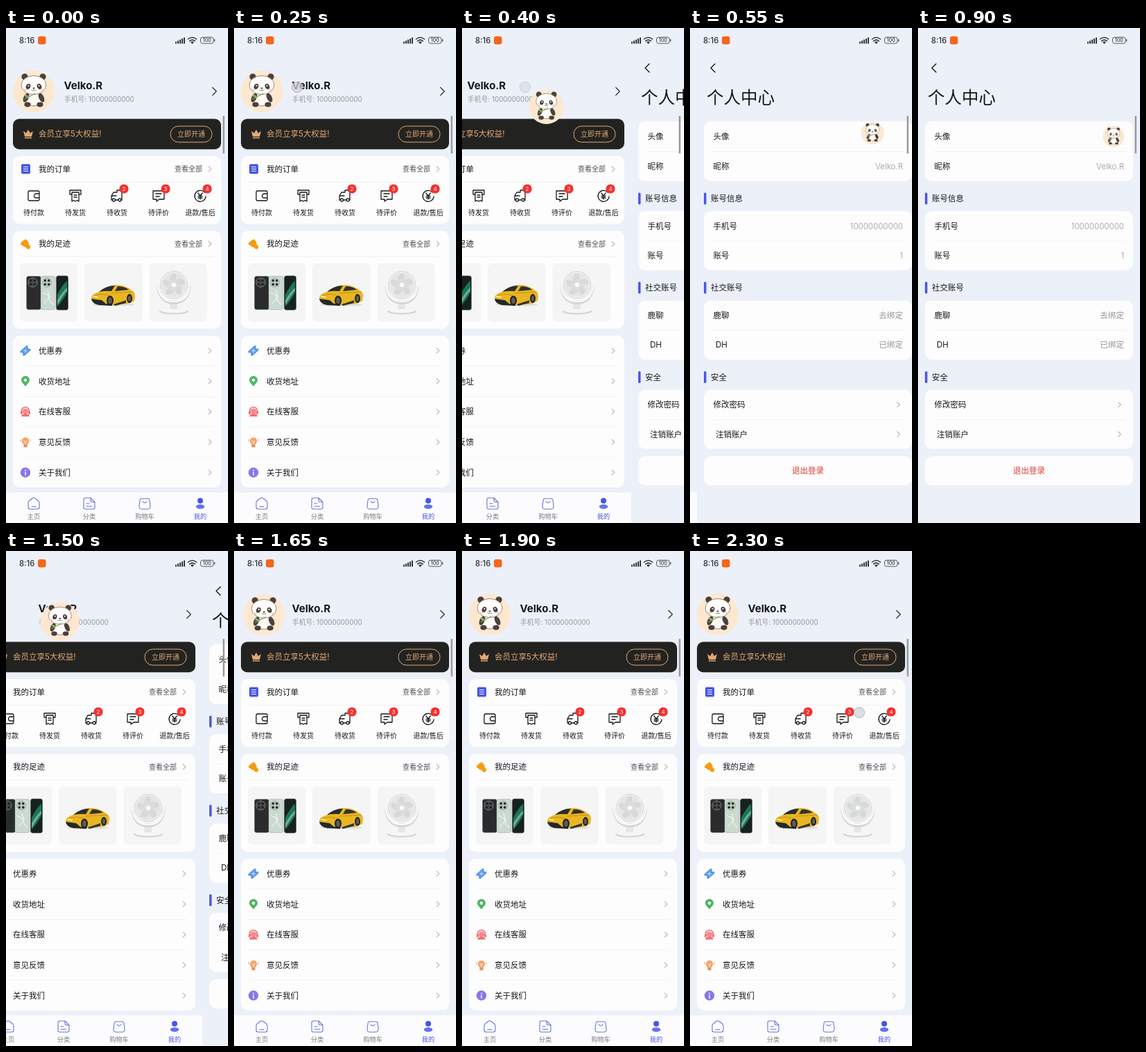
Write an HTML page that moves like this. It is 320x711 px and loops after 2.35 s.

```html
<!DOCTYPE html>
<html lang="zh-CN">
<head>
<meta charset="utf-8">
<style>
html, body { margin: 0; height: 100%; overflow: hidden; background: #ecf0f8; }
svg { display: block; width: 100vw; height: 100vh; font-family: Inter, "Noto Sans CJK SC", "Noto Sans CJK", sans-serif; }
</style>
</head>
<body>
<svg id="stage" viewBox="0 0 320 711"></svg>
<script>
const INK = '#17181a', GREY = '#96979b', BLUE = '#4656e6', GOLD = '#e2a873', CARD = '#fdfdfe', LINE = '#f0f1f4';
const PHONE = '10000000000', USER = 'Velko.R';

// Drawing helpers; text is placed by its vertical centre.
const text = (x, cy, size, str, fill = INK, anchor = 'start', weight = 400) =>
  `<text x="${x}" y="${cy + size * .37}" font-size="${size}" fill="${fill}" text-anchor="${anchor}" font-weight="${weight}">${str}</text>`;
const rect = (x, y, w, h, r, fill, extra = '') =>
  `<rect x="${x}" y="${y}" width="${w}" height="${h}" rx="${r}" fill="${fill}" ${extra}/>`;
const circle = (x, y, r, fill, extra = '') => `<circle cx="${x}" cy="${y}" r="${r}" fill="${fill}" ${extra}/>`;
const oval = (x, y, rx, ry, fill, extra = '') => `<ellipse cx="${x}" cy="${y}" rx="${rx}" ry="${ry}" fill="${fill}" ${extra}/>`;
const shape = (d, fill) => `<path d="${d}" fill="${fill}"/>`;
const line = (d, color = INK, width = 1.3, fill = 'none') =>
  `<path d="${d}" stroke="${color}" stroke-width="${width}" fill="${fill}" stroke-linecap="round" stroke-linejoin="round"/>`;
const group = (x, y, body, extra = '') => `<g transform="translate(${x} ${y}) ${extra}">${body}</g>`;
const chevron = (x, y, s = 3.6, color = '#8d8e93', width = 1) => line(`M${x - s / 2} ${y - s}l${s} ${s}l${-s} ${s}`, color, width);
const card = (y, h) => rect(10, y, 300, h, 10, CARD);
const rule = y => rect(22, y, 277, .8, 0, LINE);

const heading = (y, label) => text(47, y, 11.5, label, INK, 'start', 500) +
  text(283, y, 10, '查看全部', '#4d4e52', 'end') + chevron(294, y);

function orders() {
  const icons = [
    line('M8-3v-2a2 2 0 00-2-2H-6a2 2 0 00-2 2V5a2 2 0 002 2H6a2 2 0 002-2V3M8-3H3.5a3 3 0 000 6H8z'),
    line('M-5-2h-3v-6H8v6H5M-5-5H5V8l-2.5-1.5L0 8l-2.5-1.5L-5 8zM-2-1h4M-2 2h4'),
    line('M-7 6h-1V0l3-5h5v-3h7V6H6M-2 6h4M-8 0h7') +
      [-4.5, 4].map(x => circle(x, 6, 2, CARD, `stroke="${INK}" stroke-width="1.3"`)).join(''),
    line('M-8-7H8V5H1l-4 3V5h-5zM-4-3h8M-4 1h5'),
    line('M6-5a8 8 0 10 2 6M-3.2-4L0 0l3.2-4M0 0v5M-3 .5h6M-3 3h6'),
  ];
  const labels = ['待付款', '待发货', '待收货', '待评价', '退款/售后'];
  return labels.map((label, i) => {
    const x = 40 + 60 * i;
    const badge = i > 1 ? circle(x + 10, 231, 6.6, '#f5302f') + text(x + 10, 231, 8, i, '#fff', 'middle') : '';
    return group(x, 241, icons[i]) + text(x, 265, 10, label, INK, 'middle') + badge;
  }).join('');
}

function phones() {
  const back = (x, fill, lens) => rect(x, 356.5, 21, 48, 3, fill, 'stroke="#8a8c8b" stroke-width=".4"') +
    circle(x + 9, 365.5, 6.8, lens, 'stroke="#999" stroke-width=".5"') +
    [[-2.7, -2.7], [2.7, -2.7], [-2.7, 2.7], [2.7, 2.7]].map(([dx, dy]) => circle(x + 9 + dx, 365.5 + dy, 1.7, '#1b2020')).join('');
  return back(29.5, '#2a2b2c', '#48494b') + back(50, '#cbdad1', '#b4c4ba') +
    line('M53 380l8 4 2 8 5 5M60 377l3 9-8 10', '#eef4f0', 1.1) +
    rect(72.5, 356, 17, 49, 3, '#17211f', 'stroke="#555" stroke-width=".6"') +
    shape('M74 383q7-14 14-20v17q-5 10-14 20z', '#1b7656') + shape('M74 391q8-13 14-18v4q-6 7-14 21z', '#6fae8f');
}

const car = () =>
  oval(155, 397.5, 31, 2, '#dedede') +
  shape('M123 388q0-6 11-9q12-9 25-10q13 0 22 8q5 2 5 8l-1 7-9 4-23 2-22-2q-8-2-8-8z', '#e9b622') +
  shape('M134 379q10-9 23-9l-5 8q-9-1-18 1z', '#2b2c2d') + shape('M157 378l4-7q10 0 16 5z', '#303132') +
  line('M128 384l9-2 12 2M152 381l31-2', '#c38d12', .9) +
  shape('M123 389l15 2 6 5 9 1v2l-19-1q-10-2-11-9z', '#262729') + shape('M155 397l18-6v4l-16 4z', '#34332f') +
  line('M126 385.5l6 1', '#fff3c4', 1.4) + oval(150, 391.5, 5, 7, '#222324') + oval(150, 391.5, 2.8, 4.5, '#5e5c52') +
  oval(178, 388.5, 4, 6.5, '#222324') + oval(178, 388.5, 2.1, 4, '#5e5c52');

function fan() {
  let blades = '', grille = '';
  for (let a = 0; a < 360; a += 72) blades += `<ellipse cx="8" cy="-4" rx="8" ry="4.5" fill="#d3d4d4" transform="rotate(${a})"/>`;
  for (let a = 0; a < 360; a += 15) grille += `<path d="M4 0H18" stroke="#f1f1f1" stroke-width=".5" transform="rotate(${a})"/>`;
  return oval(242, 407, 21, 4.5, '#d6d6d6') + oval(242, 405, 20, 4.2, '#f6f6f6') + rect(236, 391, 11, 13, 2, '#e6e6e6') +
    line('M219 372q3 23 23 23t23-23', '#d4d4d4', 3.5) + line('M219 371q3 22 23 22t23-22', '#fafafa', 2.2) +
    circle(242, 369, 19.5, '#efefef', 'stroke="#cdcecf" stroke-width=".8"') + circle(242, 369, 17.5, '#e3e4e4') +
    group(242, 369, blades + grille) + circle(242, 369, 4, '#fafafa', 'stroke="#c4c4c4" stroke-width=".6"');
}

function menu() {
  const icons = [
    group(0, 0, rect(-7, -4.5, 14, 9, 1.5, '#5a96e8') + circle(-7, 0, 1.8, CARD) + circle(7, 0, 1.8, CARD) +
      line('M-2-2l4 4M2-2l-4 4', '#d8e8ff', 1), 'rotate(-42)'),
    shape('M0 7.5C-4 3-6 1-6-1.5a6 6 0 0112 0C6 1 4 3 0 7.5z', '#4fb763') + circle(0, -1.5, 2.2, '#fff'),
    line('M-5.5 0v-1a5.5 5.5 0 0111 0v1', '#ef6f73', 1.6) + circle(0, -.5, 4, '#f5898b') + rect(-7, -1, 3, 5, 1.5, '#ef6f73') +
      rect(4, -1, 3, 5, 1.5, '#ef6f73') + shape('M-6 7q1-4 6-4t6 4z', '#ef6f73'),
    circle(0, -1.5, 5.2, '#f0a66d') + rect(-2.6, 3, 5.2, 4.5, 1, '#e39456') + line('M-2-2l2 2 2-2M0 0v3', '#fff', .9) +
      line('M-7-4v3M7-4v3', '#f0a66d', 1),
    circle(0, 0, 7.2, '#8878e6') + circle(0, -3, 1, '#fff') + line('M0-.3v4', '#fff', 1.4),
  ];
  return ['优惠券', '收货地址', '在线客服', '意见反馈', '关于我们'].map((label, i) => {
    const y = 463.5 + 43.75 * i;
    return group(28, y, icons[i]) + text(47, y, 11.5, label) + chevron(294, y) + (i ? rule(y - 22) : '');
  }).join('');
}

function tabs() {
  const icons = [
    'M-8-1q0-2 1.5-3L-2-7.5q2-1.4 4 0L6.500-4Q8-3 8-1v6q0 3-3 3H-5q-3 0-3-3zM-3 4.500h6',
    'M-8-5.500q0-2.500 2.500-2.500H2l6 6v7.500q0 2.500-2.500 2.500h-11q-2.500 0-2.500-2.500zM2-8v3.500q0 2.500 2.500 2.500H8M-4 0h4M-4 4h8',
    'M-4.500-7h9q2 0 2.400 2l1.100 8q.5 5-3.500 5h-9q-4 0-3.500-5l1.100-8q.4-2 2.400-2zM-3-3q3 4 6 0',
  ].map(d => line(d, '#6873dc', 1.1));
  icons.push(circle(0, -4, 4, BLUE) + oval(0, 4.5, 6.2, 3.3, '#6572ea'));
  return rect(0, 667, 320, 44, 0, '#fcfcfe') + ['主页', '分类', '购物车', '我的'].map((label, i) =>
    group(40 + 80 * i, 683, icons[i]) + text(40 + 80 * i, 701.5, 9.2, label, i == 3 ? BLUE : '#7a7b80', 'middle')).join('');
}

const footprint = () => {
  const toes = [-4, -1.4, 1.4, 4].map((x, i) => circle(x, -5.5 + Math.abs(x) * .25, 1.7 - i * .15, '#f79a0f')).join('');
  return group(28.5, 310.5, toes + shape('M-5-2q0-3 5-3t5 3q0 3-2 5v3q-.5 2.500-3 2.500T-3 6V3q-2-2-2-5z', '#f79a0f'), 'rotate(-42)');
};

const profilePage = () =>
  rect(0, 0, 320, 711, 0, '#ecf0f8') +
  text(83.5, 82.5, 15, USER, INK, 'start', 700) + text(84, 102.5, 9.8, '手机号: ' + PHONE, GREY) + chevron(300.5, 91, 5.5, '#333', 1.3) +
  rect(10, 130.6, 300, 43.6, 9, '#222321') +
  shape('M25 148l4 3 3-5 3 5 4-3-2 8h-10zM27 157h10v1.5H27z', GOLD) +
  text(47, 152.2, 11.5, '会员立享5大权益!', GOLD) +
  rect(237, 141, 60, 23, 11.5, 'none', `stroke="${GOLD}"`) + text(267, 152.5, 10, '立即开通', GOLD, 'middle') +
  card(184, 97.5) + rect(22, 195.5, 13, 14, 2, BLUE) + line('M25.5 199.5h6M25.5 202.5h6M25.5 205.5h6', '#fff', 1) +
  heading(202.5, '我的订单') + rule(221) + orders() +
  card(291.5, 140.5) + footprint() + heading(310, '我的足迹') + rule(328) +
  [20, 113, 206.5].map(x => rect(x, 338, 83.5, 83.5, 7, '#f5f5f6')).join('') + phones() + car() + fan() +
  card(442, 218) + menu() + tabs();

function detailPage() {
  const row = (y, label, value, x = 23.5) => text(x, y, 11.5, label) +
    (value ? text(297, y, 11.6, value, GREY, 'end', 300) : chevron(290.5, y));
  const section = (y, label) => rect(10, y - 8.5, 3.5, 17, 1.5, '#4b58e6') + text(20, y, 11.5, label, INK, 'start', 500);
  return rect(0, 0, 320, 711, 0, '#ecf0f8') + line('M26 51.5l-6 6 6 6', INK, 1.4) + text(14, 100, 24.5, '个人中心') +
    card(134, 86) + rule(177) + text(23.5, 156, 11.5, '头像') + row(199, '昵称', USER) +
    section(245, '账号信息') + card(263, 85) + rule(305.5) + row(284.5, '手机号', PHONE) + row(327, '账号', '1') +
    section(373, '社交账号') + card(391.5, 85) + rule(433.5) + row(412.5, '鹿聊', '去绑定') + row(455, 'DH', '已绑定', 27) +
    section(501.5, '安全') + card(519.5, 85) + rule(562) + row(541, '修改密码') + row(583.5, '注销账户', '', 27) +
    card(615, 42) + text(160, 636, 11.5, '退出登录', '#dc3a32', 'middle');
}

const avatar = () => {
  const dark = '#4a403d', edge = 'stroke="#6b5d56" stroke-width=".7"';
  const mirrored = draw => draw(-1) + draw(1);
  return circle(0, 0, 30, '#fde8cf') +
    mirrored(s => circle(s * 13, -21, 4.6, dark)) +
    oval(0, 11, 12, 10, '#fffaf4', edge) +
    mirrored(s => oval(s * 11, 9, 3.6, 7, dark, `transform="rotate(${-25 * s} ${s * 11} 9)"`) + oval(s * 9, 19, 4.6, 3.4, dark)) +
    oval(0, -9, 18, 13.5, '#fffdfa', edge) +
    mirrored(s => oval(s * 8, -7, 3.2, 4, dark, `transform="rotate(${-25 * s} ${s * 8} -7)"`) +
      circle(s * 7.5, -8, 1.1, '#fff') + oval(s * 12.5, -2, 2.4, 1.4, '#f9cdbf')) +
    oval(0, -4.5, 1.6, 1, dark) + line('M-3-2q1.5 2 3 0q1.5 2 3 0', dark, .7) +
    line('M-13 11L2 3', '#7da35a', 1.3) + oval(-10, 7, 3.6, 1.6, '#86b35f', 'transform="rotate(35 -10 7)"');
};

function statusBar() {
  const bars = [3, 4.5, 6, 7.5, 9].map((h, i) => rect(244 + 3 * i, 22.5 - h, 2, h, .6, '#35373b')).join('');
  return text(19, 18, 11.3, '8:16', '#303236', 'start', 500) + rect(46, 12, 11.5, 11.5, 3, '#f4661b') + bars +
    line('M262.5 16q6-5 12 0M264.7 18.7q3.8-3.2 7.6 0', '#35373b', 1.6) + shape('M266 20.3q2.5-2 5 0l-2.5 2.7z', '#35373b') +
    rect(280.5, 13.2, 18.5, 9, 2.8, 'none', 'stroke="#55575b"') + rect(300, 16, 1.3, 3.6, .6, '#55575b') +
    text(289.8, 17.7, 7, '100', '#35373b', 'middle', 500);
}

const stage = document.getElementById('stage');
stage.innerHTML = `<g id="profile">${profilePage()}</g><g id="detail">${detailPage()}</g><g id="avatar">${avatar()}</g>` +
  statusBar() + rect(312.6, 126, 2.4, 54.5, 1.2, '#97989c') + '<path id="bulge" fill="#2b2b2c"/>' +
  `<g id="touch">${circle(0, 0, 7.6, '#d3d4d9', 'fill-opacity=".75" stroke="#b4b5ba"')}</g>`;
const [profile, detail, hero, bulge, touch] = ['profile', 'detail', 'avatar', 'bulge', 'touch'].map(id => document.getElementById(id));

const LOOP = 2350, STEP = 50;
const clamp = v => Math.min(1, Math.max(0, v));
const mix = (a, b, p) => a + (b - a) * p;
const move = (el, x, y = 0, s = 1) => el.setAttribute('transform', `translate(${x} ${y}) scale(${s})`);

// cubic-bezier(.4, 0, .2, 1)
function ease(x) {
  let lo = 0, hi = 1;
  for (let i = 0; i < 20; i++) {
    const s = (lo + hi) / 2;
    if (1.2 * s * (1 - s) ** 2 + .6 * s * s * (1 - s) + s ** 3 < x) lo = s; else hi = s;
  }
  return lo * lo * (3 - 2 * lo);
}
const slide = ms => ease(clamp(ms / 284));

// Critically damped spring, 20 rad/s
function spring(ms) {
  const x = Math.max(0, ms) / 50;
  return 1 - (1 + x) * Math.exp(-x);
}

function fingerAt(t) {
  if (t >= 250 && t <= 400) return [91, 85, t < 400 ? 1 : .6];
  if (t >= 1150 && t <= 1300) {
    const p = (t - 1150) / 150;
    return [mix(314, 256, p), mix(412, 473, p), 1];
  }
  if (t >= 2250) return [244, 232, 1];
  return [0, 0, 0];
}

function draw(t) {
  const page = Math.round(320 * (slide(t - 329) - slide(t - 1327)));
  move(profile, -page);
  move(detail, 320 - page);

  const p = spring(t - 340) - spring(t - 1334);
  move(hero, mix(40, 282, p), mix(91, 156, p), mix(1, .51, p));

  const depth = 15 * (clamp((t - 1150) / 150) - clamp((t - 1300) / 100));
  bulge.setAttribute('d', `M320 300C320 355 ${320 - depth} 370 ${320 - depth} 410S320 465 320 520z`);

  const [x, y, alpha] = fingerAt(t);
  move(touch, x, y);
  touch.setAttribute('opacity', alpha);
}

const start = performance.now();
function frame() {
  const t = (performance.now() - start) % LOOP;
  draw(Math.floor(t / STEP) * STEP);
  requestAnimationFrame(frame);
}
frame();
</script>
</body>
</html>
```
